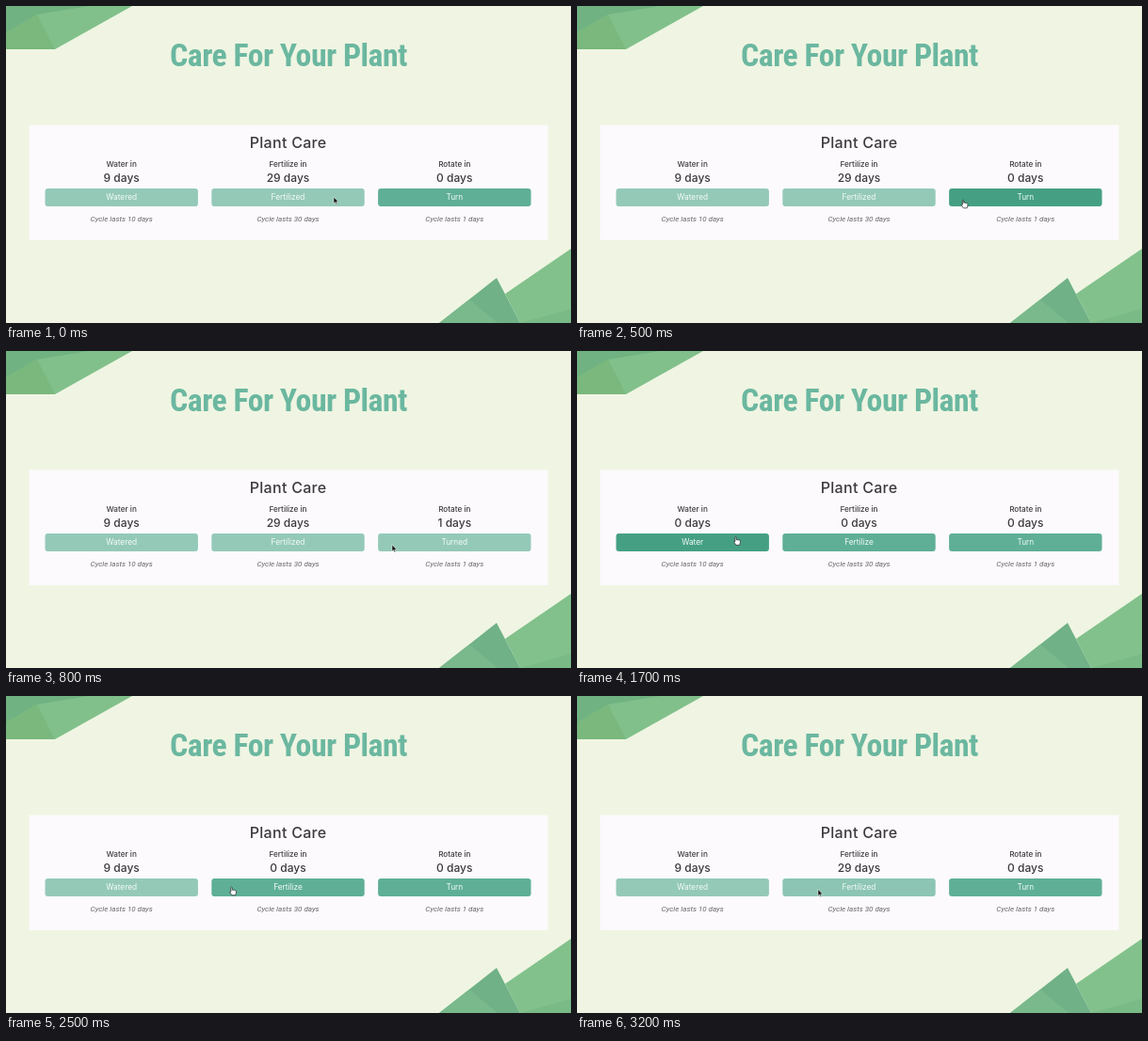
Recreate the animation shown at these times as an HTML page. Size 600 by 337 pixels, loop 3300 ms.

```html
<!DOCTYPE html>
<html lang="en">
<head>
<meta charset="utf-8">
<title>Care For Your Plant</title>
<style>
  html, body { margin: 0; width: 100%; height: 100%; overflow: hidden; background: #eff5e2; }
  svg { display: block; width: 100%; height: 100%; }
  text { font-family: Inter, "Open Sans", sans-serif; text-anchor: middle; fill: #3c3a3e; }
  .title { font: 700 30px "Roboto Condensed", Roboto, "Open Sans", sans-serif; font-stretch: 75%;
           letter-spacing: -.015em; fill: #6bb7a0; }
  .heading { font-size: 16px; font-weight: 500; letter-spacing: .3px; }
  .task { font-size: 8.2px; font-weight: 500; }
  .days { font-size: 12px; font-weight: 500; }
  .label { font-size: 8.3px; fill: #f4fbf8; }
  .cycle { font: italic 8px Roboto, sans-serif; fill: #67656a; }
</style>
</head>
<body>
<svg id="stage" viewBox="0 0 600 337">
  <rect width="600" height="337" fill="#eff5e2"/>
  <g id="topCorner">
    <path fill="#81c08b" d="M0 0H134L52 46H0Z"/>
    <path fill="#70b281" d="M0 0H88L33 9 0 28Z"/>
    <path fill="#7ab87d" d="M0 28L33 9 52 46H0Z"/>
  </g>
  <g id="bottomCorner">
    <path fill="#82c18c" d="M600 258L530 306 546 337H600Z"/>
    <path fill="#79ba86" d="M600 322L546 337H600Z"/>
    <path fill="#70b187" d="M521 289L460 337H546Z"/>
    <path fill="#7ab98c" d="M460 337L492 312 522 337Z"/>
  </g>
  <text class="title" x="300">Care For Your Plant</text>
  <rect x="24.5" y="126.5" width="551" height="122.5" fill="#fcfafd"/>
  <text class="heading" x="299.6" y="151">Plant Care</text>
  <g id="columns"></g>
  <g id="cursor">
    <path id="arrow" fill="#111" stroke="#fff" stroke-width=".5"
          d="M0 0V7L1.6 5.6 2.6 7.9 3.7 7.4 2.7 5.2H4.9Z"/>
    <path id="hand" fill="#fff" stroke="#222" stroke-width=".7" stroke-linejoin="round"
          d="M-.6 .4Q0-.4 .7 .4V3.2Q1.6 2.6 2.2 3.4 3 2.9 3.6 3.7 4.6 3.3 4.9 4.2V6.2L4.2 8.8H.4L-1.9 5.6Q-2.1 4.6-.6 5.2Z"/>
  </g>
</svg>
<script>
const LOOP = 3300, STEP = 100;
const SHADES = [[148, 201, 184], [95, 175, 150], [69, 160, 131]]; // done, due, hovered

// Each shade track lists [time, shade level].
const tasks = [
  { x: 122.7, name: 'Water in', due: 'Water', done: 'Watered', cycle: 10, left: 9,
    isDue: t => t >= 1700 && t < 1900,
    shade: [[0, 0], [1600, 0], [1700, 2], [1800, 2], [1900, 1.2], [2200, 0]] },
  { x: 299.5, name: 'Fertilize in', due: 'Fertilize', done: 'Fertilized', cycle: 30, left: 29,
    isDue: t => t >= 1700 && t < 2900,
    shade: [[0, 0], [1600, 0], [1700, 1], [2500, 1], [2700, 2], [2800, 2], [2900, 1.2], [3200, .15]] },
  { x: 476.3, name: 'Rotate in', due: 'Turn', done: 'Turned', cycle: 1, left: 1,
    isDue: t => t < 700 || t >= 1700,
    shade: [[0, 1], [300, 1], [500, 2], [600, 2], [700, .6], [800, 0], [1600, 0], [1700, 1]] }
];

const cursorPath = [
  [0, 348, 203], [100, 362, 204], [200, 382, 205], [300, 398, 205.5], [400, 406, 206],
  [500, 410, 206], [1600, 410, 206], [1700, 168.5, 197.5], [2100, 168.5, 197.5],
  [2200, 174, 199], [2300, 196, 202], [2400, 224, 203], [2500, 239.5, 203],
  [2600, 249, 204.5], [2700, 256, 205.5]
];
const pointing = [[300, 700], [1700, 1900], [2500, 2900]];

const byId = id => document.getElementById(id);

function add(tag, attributes, content = '') {
  const node = document.createElementNS('http://www.w3.org/2000/svg', tag);
  for (const key in attributes) node.setAttribute(key, attributes[key]);
  node.textContent = content;
  return byId('columns').appendChild(node);
}

function sample(track, time) {
  const next = track.findIndex(key => key[0] > time);
  if (next < 0) return track.at(-1).slice(1);
  const a = track[next - 1], b = track[next];
  const part = (time - a[0]) / (b[0] - a[0]);
  return a.slice(1).map((value, i) => value + (b[i + 1] - value) * part);
}

function shadeColor(level) {
  const i = Math.min(1, Math.floor(level));
  const rgb = SHADES[i].map((c, k) => Math.round(c + (SHADES[i + 1][k] - c) * (level - i)));
  return `rgb(${rgb})`;
}

for (const task of tasks) {
  const write = (kind, y, content) => add('text', { class: kind, x: task.x, y }, content);
  write('task', 170.6, task.name);
  task.daysText = write('days', 187.3);
  task.button = add('rect', { x: task.x - 81.2, y: 194, width: 162.4, height: 19, rx: 3 });
  task.label = write('label', 206.2);
  write('cycle', 229, `Cycle lasts ${task.cycle} days`);
}

// Keep the title's proportions and centre its capitals vertically.
const title = document.querySelector('.title');
const titleSize = Math.min(36, 30 * 252 / title.getComputedTextLength());
title.style.fontSize = titleSize + 'px';
title.setAttribute('y', 52 + titleSize * .356);

function draw(now) {
  const t = Math.floor(now % LOOP / STEP) * STEP;
  for (const task of tasks) {
    const due = task.isDue(t);
    task.daysText.textContent = `${due ? 0 : task.left} days`;
    task.label.textContent = due ? task.due : task.done;
    task.button.setAttribute('fill', shadeColor(sample(task.shade, t)[0]));
  }
  const isHand = pointing.some(([from, to]) => t >= from && t < to);
  byId('hand').style.display = isHand ? '' : 'none';
  byId('arrow').style.display = isHand ? 'none' : '';
  byId('cursor').setAttribute('transform', `translate(${sample(cursorPath, t)})`);
}

const start = performance.now();
function tick() {
  draw(performance.now() - start);
  requestAnimationFrame(tick);
}
tick();
</script>
</body>
</html>
```
